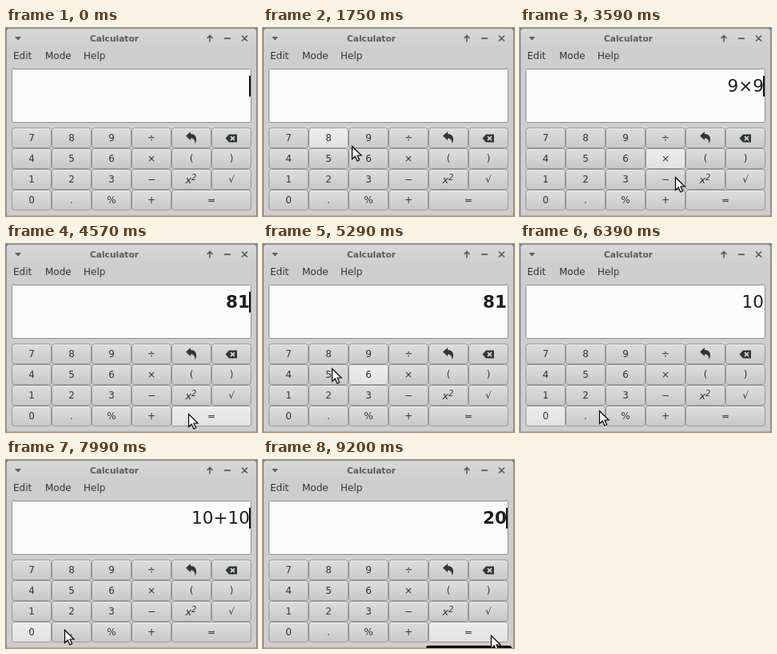
An HTML page for the animation above (9460 ms loop, 314 px wide and 236 px high).

```html
<!DOCTYPE html>
<html lang="en">
<head>
<meta charset="utf-8">
<title>Calculator</title>
<style>
html, body { margin: 0; width: 100%; height: 100%; overflow: hidden; background: #5b8296; }
svg { display: block; width: 100%; height: 100%; }
text { font: 12px "DejaVu Sans", sans-serif; fill: #2d3439; }
.title { font-size: 10.67px; font-weight: bold; fill: #5b5b5b; }
.mid { text-anchor: middle; }
.entry { font-size: 21.6px; text-anchor: end; fill: #1c1f22; }
.line { fill: none; stroke: #5c5c5c; stroke-width: 1.7; }
</style>
</head>
<body>
<svg id="stage" viewBox="0 0 314 236">
  <defs>
    <linearGradient id="bar" x1="0" y1="0" x2="0" y2="1">
      <stop offset="0" stop-color="#d8d8d8"/><stop offset="1" stop-color="#cecece"/>
    </linearGradient>
    <linearGradient id="face" x1="0" y1="0" x2="0" y2="1">
      <stop offset="0" stop-color="#dedede"/><stop offset="1" stop-color="#c8c8c8"/>
    </linearGradient>
  </defs>
  <path d="M.5 236V5Q.5 .5 5 .5H309Q313.5 .5 313.5 5V236Z" fill="#cecece" stroke="#8b8b8b"/>
  <path d="M1 26V5Q1 1 5 1H309Q313 1 313 5V26Z" fill="url(#bar)"/>
  <path d="M11 11h8l-4 4.5z" fill="#5c5c5c"/>
  <text class="title mid" x="135.5" y="17">Calculator</text>
  <path class="line" d="M255 17.5V10M251.5 13L255 9.5L258.5 13M273 13.2H281M295 9.5L302 16.5M302 9.5L295 16.5"/>
  <text x="9" y="39">Edit</text>
  <text x="49" y="39">Mode</text>
  <text x="97" y="39">Help</text>
  <rect x="7.5" y="51.5" width="299" height="67" rx="1" fill="#fcfcfc" stroke="#8e8e8e"/>
  <text id="entry" class="entry" x="305" y="80"></text>
  <rect id="caret" x="304" y="60" width="2" height="26" fill="#111"/>
  <g id="keys"></g>
  <rect id="strip" x="204" y="233" width="107" height="12" rx="3"/>
  <path id="pointer" d="M.5 .5V16.5L4.2 13L6.8 19L9.6 17.8L7 12H12Z" fill="#fff" stroke="#000" stroke-width="1.2"/>
</svg>
<script>
const LOOP = 9460;
const BLINK = 1140;       // caret period, lit for two thirds
const HOVER_LAG = 110;
const CLICK = 160;        // from arriving on a key to its effect
const $ = id => document.getElementById(id);

function add(parent, tag, attrs, text = '') {
  const el = document.createElementNS('http://www.w3.org/2000/svg', tag);
  for (const name in attrs) el.setAttribute(name, attrs[name]);
  el.textContent = text;
  parent.append(el);
  return el;
}

// Keypad
const icons = {
  undo(g) {
    add(g, 'path', { d: 'M225 135.5L231 130V133C237.5 133 240 138.5 236.5 145.5C236.5 140.5 235 138.5 231 138.5V141Z', fill: '#30373b' });
  },
  erase(g) {
    add(g, 'path', { d: 'M274.5 138.5L279 133.5H289V143.5H279Z', fill: '#30373b' });
    add(g, 'path', { d: 'M281 136L286 141M286 136L281 141', stroke: '#e4e4e4', 'stroke-width': 1.7 });
  },
  square(g) {
    add(g, 'text', { x: 224.5, y: 195, style: 'font-size:13px;font-style:italic' }, 'x');
    add(g, 'text', { x: 232, y: 191, style: 'font-size:10px;font-style:italic' }, '2');
  }
};
const rows = [
  ['7', '8', '9', '÷', 'undo', 'erase'],
  ['4', '5', '6', '×', '(', ')'],
  ['1', '2', '3', '−', 'square', '√'],
  ['0', '.', '%', '+', '=']
];
const keys = rows.flatMap((row, r) => row.map((label, c) => {
  const x = 7 + 50 * c, y = 125 + 26 * r, w = label === '=' ? 100 : 50;
  const g = add($('keys'), 'g', {});
  add(g, 'rect', { x: x + .5, y: y + .5, width: w - 1, height: 25, rx: 3, fill: 'url(#face)', stroke: '#969696' });
  add(g, 'path', { d: `M${x + 3} ${y + 1.5}H${x + w - 3}`, stroke: '#ececec' });
  const inner = { x: x + 1, y: y + 1, width: w - 2, height: 24, rx: 2.5 };
  const glow = add(g, 'rect', { ...inner, fill: '#fff', opacity: .45 });
  const dent = add(g, 'rect', { ...inner, fill: '#000', opacity: .14 });
  if (icons[label]) icons[label](g);
  else add(g, 'text', { x: x + w / 2, y: y + 17, class: 'mid' }, label);
  return { label, glow, dent, has: p => p && p[0] >= x && p[0] < x + w && p[1] >= y && p[1] < y + 26 };
}));

// Where the pointer rests, and the key it clicks there
const stop = (arrive, leave, x, y, key) => ({ arrive, leave, x, y, key });
const stops = [
  stop(800, 800, 215, 47),
  stop(1500, 1620, 92, 146),
  stop(1920, 2120, 140, 151, '9'),
  stop(2360, 2560, 182, 160, '×'),
  stop(2820, 3064, 140, 148, '9'),
  stop(4000, 4490, 231, 214, '='),
  stop(5567, 5580, 58, 145),
  stop(5760, 5920, 38, 188, '1'),
  stop(6100, 6230, 40, 208, '0'),
  stop(6585, 6780, 178, 210, '+'),
  stop(7277, 7450, 38, 191, '1'),
  stop(7640, 7820, 40, 212, '0'),
  stop(8560, LOOP, 285, 220, '=')
];
const clicks = stops.filter(s => s.key).map(s => ({ key: s.key, at: s.arrive + CLICK }));

const ease = u => u * u * (3 - 2 * u);

function pointerAt(t) {
  const i = stops.findLastIndex(s => s.arrive <= t);
  if (i < 0) return null;
  const a = stops[i], b = stops[i + 1] || a;
  const s = t > a.leave ? ease((t - a.leave) / (b.arrive - a.leave)) : 0;
  return [a.x + (b.x - a.x) * s, a.y + (b.y - a.y) * s];
}

function evaluate(text) {
  const [, a, op, b] = text.match(/(\d+)(\D)(\d+)/);
  return String(op === '+' ? +a + +b : a * b);
}

// Entry contents at t; a result restarts the caret's blinking
function entryAt(t) {
  let text = '', done = false, since = -BLINK / 3;
  for (const { key, at } of clicks) {
    if (at > t) break;
    if (key === '=') {
      text = evaluate(text);
      since = at;
    } else {
      text = done ? key : text + key;
    }
    done = key === '=';
  }
  return { text, done, caret: (t - since) % BLINK < BLINK * 2 / 3 };
}

function show(el, on) {
  el.style.display = on ? '' : 'none';
}

function render(t) {
  const { text, done, caret } = entryAt(t);
  $('entry').textContent = text;
  $('entry').style.fontWeight = done ? 'bold' : 'normal';
  show($('caret'), caret);
  show($('strip'), t >= 9200);

  const pos = pointerAt(t), hover = pointerAt(t - HOVER_LAG);
  show($('pointer'), pos);
  if (pos) $('pointer').setAttribute('transform', `translate(${pos.map(Math.round)})`);

  const click = clicks.find(c => t < c.at && t >= c.at - 90);
  for (const key of keys) {
    show(key.glow, key.has(hover));
    show(key.dent, click && click.key === key.label);
  }
}

const start = performance.now();
function tick() {
  render((performance.now() - start) % LOOP);
  requestAnimationFrame(tick);
}
tick();
</script>
</body>
</html>
```
